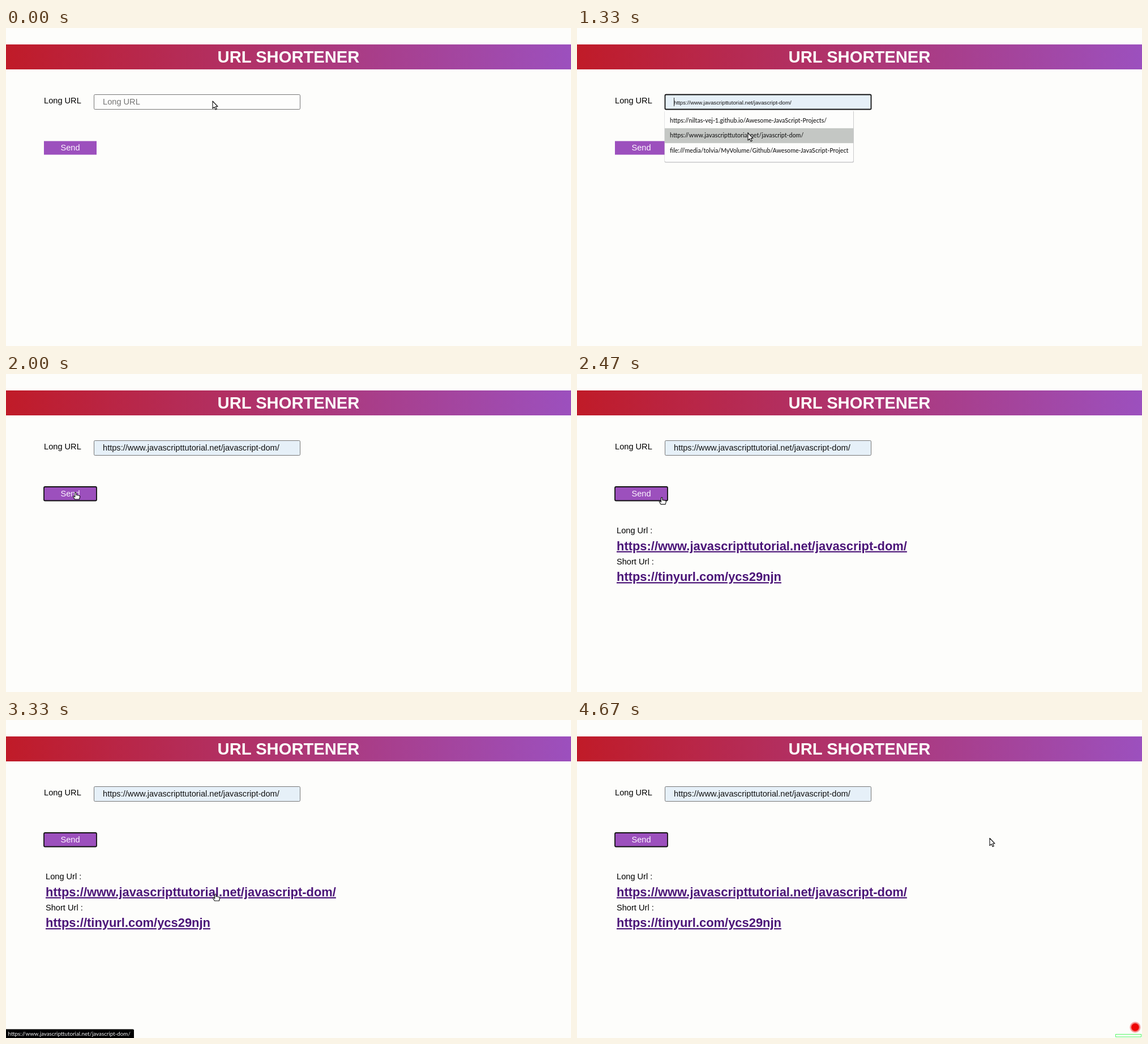
Recreate the animation shown at these times as an HTML page. Size 998 by 561 pixels, loop 5140 ms.

```html
<!DOCTYPE html>
<html lang="en">
<head>
<meta charset="utf-8">
<title>URL Shortener</title>
<style>
  html, body { margin: 0; width: 100%; height: 100%; overflow: hidden; background: #fdfdfb; }
  svg { display: block; width: 998px; height: 561px; }
  text { font: 14.61px "Liberation Sans", Arial, sans-serif; white-space: pre; }
  .title { font-size: 29.2px; font-weight: bold; fill: #fdfdfb; text-anchor: middle; }
  .button { fill: #fdf6ff; text-anchor: middle; }
  .link { font-size: 21.92px; font-weight: bold; fill: #4b1478; text-decoration: underline; }
  .option { font: 500 10.65px Lato, "Open Sans", sans-serif; fill: #1b1b1b; }
  .status { font: 9.8px Lato, "Open Sans", sans-serif; fill: #f4f4f4; }
  .cursor path { fill: #fff; stroke: #111; stroke-width: 1.1; stroke-linejoin: round; }
</style>
</head>
<body>
<svg viewBox="0 0 998 561">
  <defs>
    <linearGradient id="banner">
      <stop stop-color="#c01b28"/><stop offset="1" stop-color="#9c50be"/>
    </linearGradient>
    <radialGradient id="glow">
      <stop offset=".62" stop-color="#ee0505"/><stop offset=".7" stop-color="#f06a6a"/>
      <stop offset="1" stop-color="#fbdcdc"/>
    </radialGradient>
    <clipPath id="menuClip"><rect x="155" y="146" width="325" height="90"/></clipPath>
  </defs>

  <rect y="29" width="998" height="44" fill="url(#banner)"/>
  <text class="title" x="499" y="61">URL SHORTENER</text>

  <text x="67" y="133">Long URL</text>
  <rect id="field" x="155.5" y="117.5" width="364" height="26" rx="1.8"/>
  <text id="value" x="171" y="135"></text>
  <path id="caret" d="M0 123V138" stroke="#222"/>

  <rect x="67" y="199.5" width="93" height="24" fill="#9c50bd"/>
  <rect id="buttonRing" x="67" y="199" width="93" height="24.5" rx="2" fill="none" stroke="#111" stroke-width="1.8"/>
  <text class="button" x="113.5" y="216">Send</text>

  <g id="menu">
    <rect x="154.5" y="146" width="334.5" height="91.5" rx="2" fill="#c9c9cb"/>
    <rect x="155" y="145" width="333" height="91" rx="2" fill="#fdfdfc"/>
    <rect id="highlight" x="155" width="333" height="26.3" fill="#c4c7c4"/>
    <g id="options" clip-path="url(#menuClip)"></g>
  </g>

  <g id="result">
    <text x="70" y="280.5">Long Url :</text>
    <text class="link" id="longLink" x="70" y="310.5"></text>
    <text x="70" y="335.5">Short Url :</text>
    <text class="link" x="70" y="365.2">https://tinyurl.com/ycs29njn</text>
  </g>

  <g id="status">
    <path d="M0 545.5H224Q226 545.5 226 547.5V561H0Z"/>
    <text class="status" id="statusText" x="3.5" y="556.5"></text>
  </g>

  <g id="recorder">
    <circle cx="986" cy="542" r="10" fill="url(#glow)"/>
    <rect x="951.5" y="554.5" width="45" height="4.5" fill="none" stroke="#55f766"/>
  </g>

  <g id="cursor" class="cursor">
    <path id="arrow" d="M0 0V13L3 10.3L5.2 15L7.3 14L5.2 9.5H9Z"/>
    <path id="beam" d="M-3-5.5H3V-3.5H1V3.5H3V5.5H-3V3.5H-1V-3.5H-3Z"/>
    <path id="hand" d="M-1.2.8Q0-.8 1.2.8V4.5L6 5.2Q8 5.8 7.6 8L6.5 12H-1.5L-4.3 7.8Q-4.5 5.8-2.8 6.5L-1.2 8Z"/>
  </g>
</svg>

<script>
const LOOP = 5140, TICK = 200 / 3;
const OPEN = 800, PICK = 1590, FOCUS = 670, SEND = 1990, RESULT = 2460;
const urls = [
  "https://niltas-vej-1.github.io/Awesome-JavaScript-Projects/",
  "https://www.javascripttutorial.net/javascript-dom/",
  "file:///media/tolvia/MyVolume/Github/Awesome-JavaScript-Projects/"
];
// Pointer hot spot: time, x, y
const path = [
  [0, 365, 129], [130, 365, 129], [600, 375, 135], [930, 375, 135],
  [1330, 302, 185], [1600, 297, 190], [1930, 123, 209], [2200, 123, 209],
  [2470, 150, 218], [2860, 369, 315], [3070, 362, 309], [3600, 378, 305],
  [3930, 566.5, 224], [4200, 729, 208.5], [LOOP, 729, 208.5]
];
const $ = id => document.getElementById(id);
const show = (id, on) => $(id).setAttribute("visibility", on ? "visible" : "hidden");
const set = (id, attrs) => Object.entries(attrs).forEach(([k, v]) => $(id).setAttribute(k, v));
const within = (p, x0, y0, x1, y1) => p.x >= x0 && p.x <= x1 && p.y >= y0 && p.y <= y1;

$("longLink").textContent = $("statusText").textContent = urls[1];
urls.forEach((url, i) => {
  const text = document.createElementNS("http://www.w3.org/2000/svg", "text");
  text.setAttribute("class", "option");
  text.setAttribute("x", 164);
  text.setAttribute("y", 167 + i * 26.3);
  text.textContent = url;
  $("options").append(text);
});

function pointer(t) {
  const i = path.findIndex(key => key[0] > t);
  const [t0, x0, y0] = path[i - 1], [t1, x1, y1] = path[i];
  const k = (t - t0) / (t1 - t0);
  return { x: x0 + (x1 - x0) * k, y: y0 + (y1 - y0) * k };
}

function pointerShape(p, t, menuOpen) {
  if (t > 120 && within(p, 155, 117, 520, 144)) return "beam";
  const onButton = !menuOpen && within(p, 67, 199, 160, 224);
  const onLink = t >= RESULT && (within(p, 70, 291, 583, 317) || within(p, 70, 346, 361, 372));
  return onButton || onLink ? "hand" : "arrow";
}

function draw(time) {
  const t = Math.floor((time + 5) / TICK) * TICK % LOOP;
  const p = pointer(t);
  const menuOpen = t >= OPEN && t < PICK;
  const focused = t >= FOCUS && t < SEND;
  const picked = t >= PICK;
  const row = menuOpen && p.y >= 150.5 ? Math.floor((p.y - 150.5) / 26.3) : -1;
  const filled = picked || row >= 0;

  set("field", {
    fill: filled ? "#e6f0f8" : "#fdfdfc",
    stroke: focused ? "#111" : "#767676",
    "stroke-width": focused ? 1.8 : 1
  });
  $("value").textContent = picked ? urls[1] : row >= 0 ? urls[row] : "Long URL";
  $("value").style.fontSize = row >= 0 ? "9.74px" : "14.61px";
  $("value").style.fill = filled ? "#111" : "#757575";
  show("caret", focused);
  set("caret", { transform: `translate(${picked ? 483.5 : 171.5})` });

  show("menu", menuOpen);
  show("highlight", row >= 0);
  set("highlight", { y: 150.5 + Math.max(row, 0) * 26.3 });
  show("buttonRing", t >= SEND);
  show("result", t >= RESULT);
  show("status", t >= 3120 && t < 4120);
  show("recorder", t >= 4660);

  const shape = pointerShape(p, t, menuOpen);
  for (const id of ["arrow", "beam", "hand"]) show(id, id === shape);
  set("cursor", { transform: `translate(${p.x} ${p.y})` });
}

const start = performance.now();
function frame() {
  draw((performance.now() - start) % LOOP);
  requestAnimationFrame(frame);
}
frame();
</script>
</body>
</html>
```
